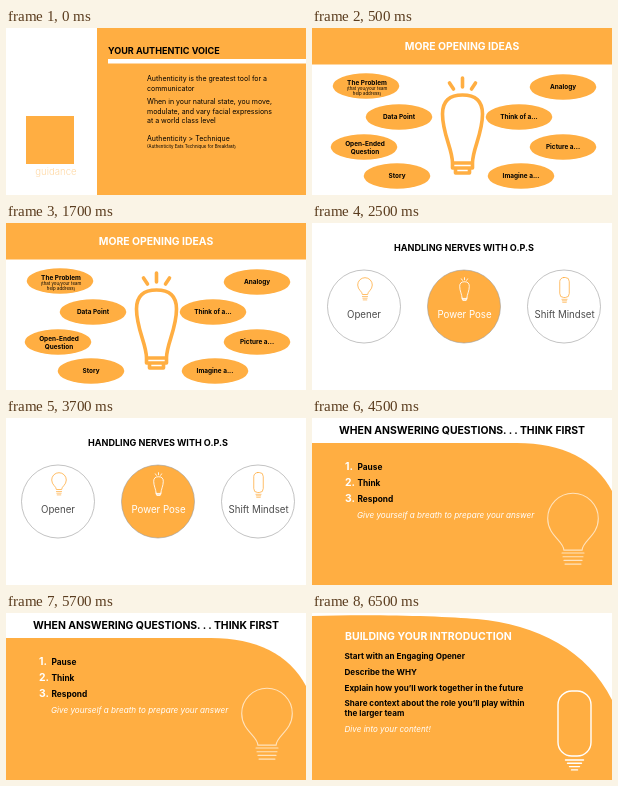
Write an HTML page that moves like this. It is 300x167 px and loops after 8000 ms.

```html
<!DOCTYPE html>
<html lang="en">
<head>
<meta charset="utf-8">
<title>Speaking slides</title>
<style>
  html, body { margin: 0; width: 100%; height: 100%; overflow: hidden; background: #fff; }
  svg { display: block; width: 100%; height: 100%; font-family: Inter, "Open Sans", sans-serif; }
  .line { fill: none; stroke-linecap: round; stroke-linejoin: round; }
</style>
</head>
<body>
<svg id="stage" viewBox="0 0 300 167" preserveAspectRatio="none"></svg>
<script>
const ORANGE = '#ffae42', WHITE = '#fff', BLACK = '#000', GREY = '#4d4d4d';
const PALE = '#ffd9a6', CREAM = '#ffe3bd';
const LOOP = 8000;

const text = (x, y, size, str, { fill = BLACK, weight = 400, anchor = 'start', style = 'normal' } = {}) =>
  `<text x="${x}" y="${y}" font-size="${size}" fill="${fill}" font-weight="${weight}" text-anchor="${anchor}" font-style="${style}">${str}</text>`;
const bold = (x, y, size, str, opts) => text(x, y, size, str, { weight: 700, ...opts });
const rect = (x, y, w, h, fill = ORANGE) => `<rect x="${x}" y="${y}" width="${w}" height="${h}" fill="${fill}"/>`;
const shape = (d, fill = ORANGE) => `<path d="${d}" fill="${fill}"/>`;
const line = (d, color, width) => `<path class="line" d="${d}" stroke="${color}" stroke-width="${width}"/>`;

// Stacked horizontal strokes under a bulb, each a little shorter.
function base(x, y, half, gap, count, shrink, color, width) {
  let d = '';
  for (let i = 0; i < count; i++) {
    const h = half - i * shrink;
    d += `M${x - h} ${y + i * gap}h${2 * h}`;
  }
  return line(d, color, width);
}

// Tall bulb with three rays, centred on x = 0, glass starting at y = 0.
function tallBulb(x, y, scale, color, width) {
  const glass = 'M-10 69C-10 55-20 40-20 20C-20 7-13 1 0 1S20 7 20 20C20 40 10 55 10 69Z';
  const rays = 'M0-7V-16M-9-5L-13-11M9-5L13-11';
  const screw = 'M-10 69V74H10V69M-7 74V79H7V74';
  return `<g transform="translate(${x} ${y}) scale(${scale})">${line(glass + rays + screw, color, width)}</g>`;
}

function roundBulb(x, y, r, color, width) {
  const n = r * 0.36, drop = r * 1.25;
  const d = `M${x - n} ${y + drop}C${x - n} ${y + r * 0.88} ${x - r} ${y + r * 0.68} ${x - r} ${y}` +
    `A${r} ${r} 0 0 1 ${x + r} ${y}C${x + r} ${y + r * 0.68} ${x + n} ${y + r * 0.88} ${x + n} ${y + drop}Z`;
  return line(d, color, width);
}

const pill = (x, y, w, h, color, width) =>
  `<rect class="line" x="${x - w / 2}" y="${y}" width="${w}" height="${h}" rx="${w * 0.42}" stroke="${color}" stroke-width="${width}"/>`;

function voice() {
  const rows = [
    [53, 'Authenticity is the greatest tool for a'], [62.5, 'communicator'],
    [76, 'When in your natural state, you move,'], [85.5, 'modulate, and vary facial expressions'],
    [95, 'at a world class level'], [113, 'Authenticity &gt; Technique']
  ];
  return rect(91, 0, 209, 167) + rect(102, 31, 198, 4.5, WHITE) +
    bold(102, 26, 9.05, 'YOUR AUTHENTIC VOICE') +
    rows.map(([y, s]) => text(141, y, 7, s)).join('') +
    text(141, 120, 4.4, '(Authenticity Eats Technique for Breakfast)') +
    rect(20, 88, 48, 48) +
    text(50, 147, 9.6, 'guidance', { fill: PALE, weight: 300, anchor: 'middle' });
}

function ideas() {
  const mid = { anchor: 'middle' }, size = 6.45;
  const ovals = [
    [54, 58], [251, 59, 'Analogy'], [87, 89, 'Data Point'], [207, 89, 'Think of a...'],
    [52, 119], [251, 119, 'Picture a...'], [85, 148, 'Story'], [209, 148, 'Imagine a...']
  ];
  return rect(0, 0, 300, 36.5) +
    bold(150, 22, 10.4, 'MORE OPENING IDEAS', { fill: WHITE, ...mid }) +
    ovals.map(([x, y, s]) => `<ellipse cx="${x}" cy="${y}" rx="33.3" ry="12.8" fill="${ORANGE}"/>` +
      (s ? bold(x, y + 2.2, size, s, mid) : '')).join('') +
    bold(55, 56.5, size, 'The Problem', mid) +
    text(55, 61.5, 4.4, '(that you/your team', mid) + text(55, 66.5, 4.4, 'help address)', mid) +
    bold(53, 117.5, size, 'Open-Ended', mid) + bold(53, 125.5, size, 'Question', mid) +
    tallBulb(150.5, 66, 1, ORANGE, 3.6);
}

function nerves() {
  const label = (x, s, fill) => text(x, 94.5, 9.7, s, { fill, anchor: 'middle' });
  return bold(152, 28, 9.05, 'HANDLING NERVES WITH O.P.S', { anchor: 'middle' }) +
    [52, 152, 252].map((x, i) =>
      `<circle cx="${x}" cy="83.5" r="36.5" fill="${i === 1 ? ORANGE : WHITE}" stroke="#9a9a9a" stroke-width=".6"/>`).join('') +
    roundBulb(53, 62, 7.3, ORANGE, 0.8) + base(53, 73.5, 2.6, 1.7, 3, 0.4, ORANGE, 0.7) +
    tallBulb(152.5, 58.5, 0.24, WHITE, 3.6) +
    pill(252.5, 54.5, 9.5, 20, ORANGE, 0.8) + base(252.5, 76.3, 2.6, 1.5, 3, 0.4, ORANGE, 0.7) +
    label(52, 'Opener', GREY) + label(152.5, 'Power Pose', WHITE) + label(252.5, 'Shift Mindset', GREY);
}

function think() {
  const steps = ['Pause', 'Think', 'Respond'];
  return shape('M0 25H205C250 25 283 41 300 73V167H0Z') +
    bold(150, 16, 10.4, 'WHEN ANSWERING QUESTIONS. . . THINK FIRST', { anchor: 'middle' }) +
    steps.map((s, i) => bold(33, 52 + i * 16, 10.4, `${i + 1}.`, { fill: WHITE }) +
      bold(45.5, 52.3 + i * 15.8, 8.3, s)).join('') +
    text(45, 99.5, 8.15, 'Give yourself a breath to prepare your answer', { fill: WHITE, style: 'italic' }) +
    roundBulb(261, 100.5, 25.3, CREAM, 1.1) + base(261, 135, 11, 3.7, 4, 1, CREAM, 1.1);
}

function intro() {
  const rows = [
    [46, 'Start with an Engaging Opener'], [61.5, 'Describe the WHY'],
    [77.5, 'Explain how you’ll work together in the future'],
    [93, 'Share context about the role you’ll play within'], [103, 'the larger team']
  ];
  return shape('M0 3C60 1 130 3 165 6C225 11 276 38 300 87V167H0Z') +
    bold(33, 27, 10.5, 'BUILDING YOUR INTRODUCTION', { fill: WHITE }) +
    rows.map(([y, s]) => bold(32.5, y, 8.1, s)).join('') +
    text(32.5, 119, 8.1, 'Dive into your content!', { fill: WHITE, style: 'italic' }) +
    pill(262.5, 78, 33, 65, WHITE, 1.4) + base(262.5, 147, 9, 3.3, 4, 2, WHITE, 1.4);
}

const slides = [[0, voice], [500, ideas], [2500, nerves], [4500, think], [6500, intro]];
const stage = document.getElementById('stage');
stage.innerHTML = slides.map(([, draw]) => `<g visibility="hidden">${draw()}</g>`).join('');
const groups = [...stage.children];
const start = performance.now();

function tick() {
  const t = (performance.now() - start) % LOOP;
  const now = slides.filter(([from]) => t >= from).length - 1;
  groups.forEach((g, i) => g.setAttribute('visibility', i === now ? 'visible' : 'hidden'));
  requestAnimationFrame(tick);
}
tick();
</script>
</body>
</html>
```
